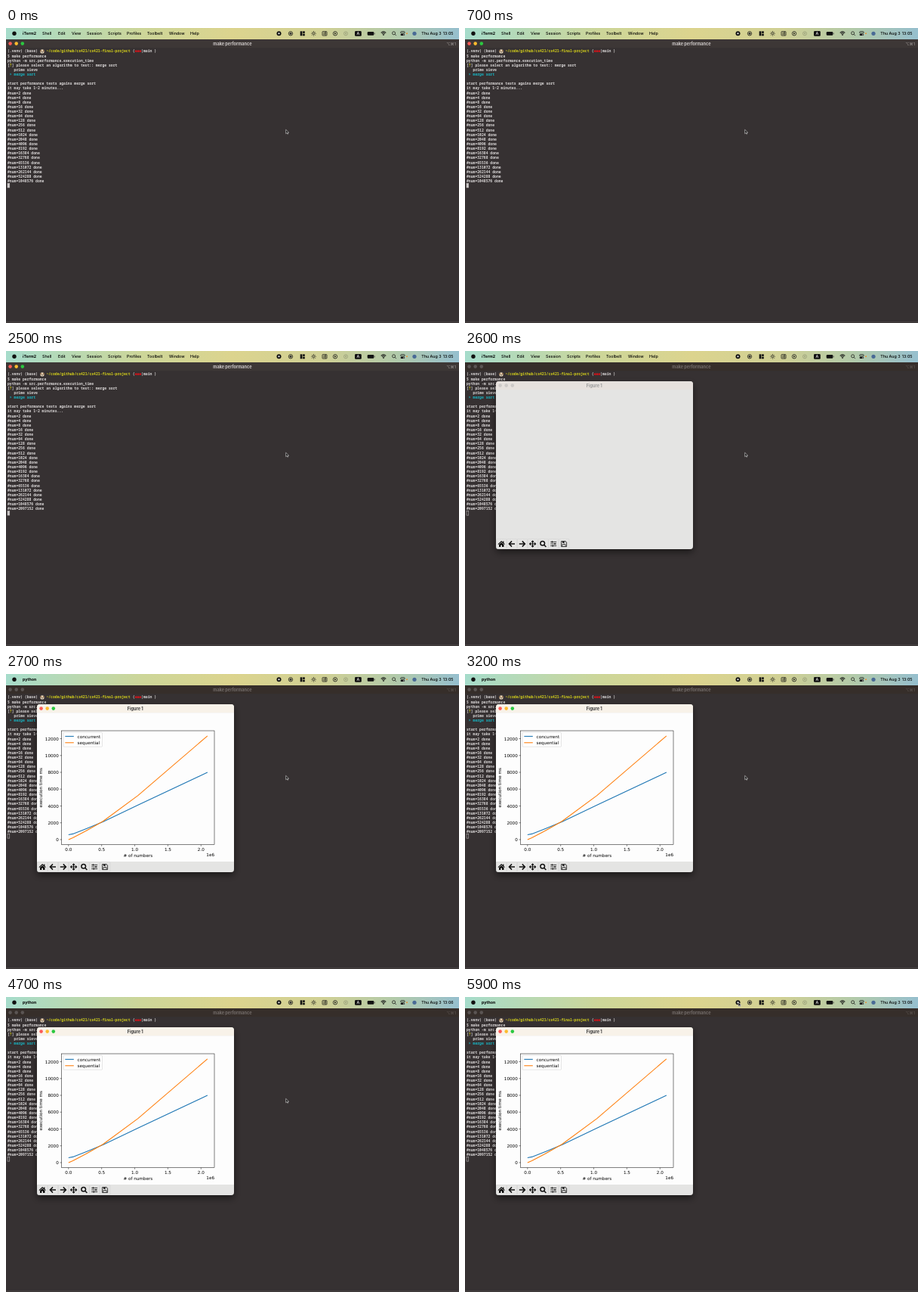
Recreate the animation shown at these times as an HTML page. Size 600x390 px, loop 6000 ms.

```html
<!DOCTYPE html>
<html lang="en">
<head>
<meta charset="utf-8">
<title>Merge sort performance</title>
<style>
  html, body { margin: 0; width: 100%; height: 100%; overflow: hidden; background: #363132; }
  svg { display: block; width: 600px; height: 390px; }
  text { white-space: pre; font: 500 5.3px Inter, sans-serif; }
  .bold { font-weight: 700; }
  .title { font-weight: 700; font-size: 5.55px; }
  .mono text { font: 600 4.76px "Noto Sans Mono", monospace; fill: #dad7d7; }
  .plot text { font: 5.66px "DejaVu Sans", sans-serif; }
  .mid { text-anchor: middle; }
  .end { text-anchor: end; }
  .line { fill: none; stroke: #111; stroke-width: .75; }
</style>
</head>
<body>
<svg id="stage" viewBox="0 0 600 390">
  <defs>
    <linearGradient id="sky">
      <stop offset="0" stop-color="#a6dccb"/>
      <stop offset=".3" stop-color="#cdd699"/>
      <stop offset=".5" stop-color="#dcd48e"/>
      <stop offset=".7" stop-color="#d0d095"/>
      <stop offset=".86" stop-color="#b2caaa"/>
      <stop offset="1" stop-color="#96bfce"/>
    </linearGradient>
    <filter id="shadow" x="-20%" y="-20%" width="140%" height="150%">
      <feDropShadow dx="0" dy="4" stdDeviation="5" flood-opacity=".5"/>
    </filter>
  </defs>
</svg>
<script>
const LOOP = 6000, STEP = 100;
const LINE_TIME = 2400, WINDOW_TIME = 2600, PLOT_TIME = 2700, CLOCK_TIME = 4000;
const MOVE_START = 5200, MOVE_END = 5800;
const COLUMN = 2.857, ROW = 6.13;

const text = (x, y, s, attrs = '') => `<text x="${x}" y="${y}" ${attrs}>${s}</text>`;
const rect = (x, y, w, h, fill, attrs = '') =>
  `<rect x="${x}" y="${y}" width="${w}" height="${h}" fill="${fill}" ${attrs}/>`;
const dot = (x, y, r, fill, attrs = '') => `<circle cx="${x}" cy="${y}" r="${r}" fill="${fill}" ${attrs}/>`;
const path = (d, attrs = 'class="line"') => `<path d="${d}" ${attrs}/>`;
const at = (x, y, s, attrs = '') => `<g transform="translate(${x} ${y})" ${attrs}>${s}</g>`;
const lights = (x, y, colors) => colors.map((c, i) => dot(x + i * 8.1, y, 2.3, c)).join('');
const LIVE = ['#fc5b57', '#fdbc2e', '#2bc840'];
const cell = (column, row, s, attrs) => text(2 + column * COLUMN, 32.4 + row * ROW, s, attrs);
const span = (color, s) => `<tspan fill="${color}">${s}</tspan>`;

function menuBar() {
  const menus = [['Shell', 48], ['Edit', 69], ['View', 87], ['Session', 107], ['Scripts', 135],
    ['Profiles', 160], ['Toolbelt', 187], ['Window', 216], ['Help', 244]];
  const rays = Array.from({length: 8}, (_, i) => `<path d="M0-2.2V-3.2" transform="rotate(${i * 45})"/>`).join('');
  return rect(0, 0, 600, 15, 'url(#sky)') + dot(11, 7.2, 2.7, '#111')
    + text(22, 9.1, 'iTerm2', 'id="appName" class="bold"')
    + `<g id="menus">${menus.map(([s, x]) => text(x, 9.1, s)).join('')}</g>`
    + at(361.5, 7.3, dot(0, 0, 3, '#111') + rect(-1, -1, 2, 2, '#eee', 'rx=".4"'))
    + at(377, 7.3, dot(0, 0, 2.7, 'none', 'class="line"') + dot(0, 0, 1.5, '#333'))
    + at(392.7, 7.3, rect(-3, -3, 2.7, 6, '#111') + rect(.4, -3, 2.7, 2.6, '#111') + rect(.4, .4, 2.7, 2.6, '#111'))
    + at(407.5, 7.3, dot(0, 0, 1.4, 'none') + `<g>${rays}</g>`, 'class="line"')
    + at(422, 7.3, rect(-3, -2.7, 6, 5.4, 'none', 'class="line" rx=".7"')
        + path('M-1.7-.7H1.5M-1.7 1H.5M1.2-2.5V2.5', 'id="trayMark" class="line"'))
    + at(436, 7.3, dot(0, 0, 2.7, 'none', 'class="line"') + path('M-.8-1.3V1.3L1.4 0Z', ''))
    + at(450, 7.3, dot(0, 0, 2.5, 'none', 'class="line"') + dot(0, 0, 1, '#333'), 'opacity=".28"')
    + rect(462, 4, 8.8, 6.8, '#111', 'rx="1.4"') + text(466.4, 9.2, 'A', 'class="mid" fill="#eee"')
    + rect(478.7, 5.1, 8.6, 4.6, '#111', 'rx="1.2"') + rect(487.8, 6.4, .8, 2, '#555')
    + at(500, 9.5, path('M-3.3-3.2Q0-6 3.3-3.2M-2-1.8Q0-3.6 2-1.8', 'class="line" style="stroke-width:1.1"') + dot(0, -.6, .9, '#111'))
    + at(513.6, 6.8, dot(0, 0, 2, 'none', 'class="line"') + path('M1.5 1.5L3.3 3.3'))
    + at(525.4, 7.3, rect(-2.8, -2.6, 5.6, 2.2, 'none', 'class="line" rx="1.1"')
        + rect(-2.8, .5, 5.6, 2.3, '#111', 'rx="1.1"') + dot(1.4, 1.6, .7, '#eee'))
    + dot(531, 7.2, .9, '#f08a24') + dot(541, 7.3, 2.6, '#496a96')
    + text(550.3, 9.1, 'Thu Aug 3') + text(578.8, 9.1, '13:05', 'id="clock"');
}

function terminal() {
  const lines = ['$ make performance', 'python -m src.performance.execution_time',
    `[${span('#d7d21a', '?')}] please select an algorithm to test:: merge sort`,
    '   prime sieve', span('#18b4c2', ' > merge sort'), '',
    'start performance tests agains merge sort', 'it may take 1~2 minutes...'];
  for (let k = 1; k <= 20; k++) lines.push(`#num=${2 ** k} done`);
  return rect(0, 14.6, 600, 375.4, '#363132') + rect(0, 14.6, 600, 11.6, '#3d3736', 'id="titleBar"')
    + path('M0 388.8H600', 'stroke="#5a5455" stroke-width=".6"')
    + `<g id="liveBar">${lights(5.6, 20.6, LIVE)}</g>`
    + `<g id="idleBar">${lights(5.6, 20.6, ['#5b5554', '#5b5554', '#5b5554'])}</g>`
    + `<g id="barText" fill="#d0cbca">${text(300, 22.5, 'make performance', 'class="mid title"')}`
    + text(596, 22.5, '⌥⌘1', 'class="end" opacity=".6"') + '</g>'
    + '<g class="mono">' + cell(0, 0, '(.venv) (base)')
    + dot(48, 30.9, 2.6, '#e6d4b8') + dot(46.2, 30.3, 1, '#8b6542') + dot(49.8, 30.3, 1, '#8b6542') + dot(48, 31.8, .7, '#333')
    + cell(18, 0, span('#d7d21a', '~/code/github/cs421/cs421-final-project'))
    + cell(58, 0, '(') + [172.2, 175, 177.8].map(x => dot(x, 30.7, 1.4, '#c9151b')).join('') + cell(62, 0, '|main )')
    + lines.map((s, i) => cell(0, i + 1, s)).join('')
    + cell(0, 29, `#num=${2 ** 21} done`, 'id="lastLine"') + '</g>'
    + rect(2, 0, 2.8, 5.6, '#cbc7c7', 'id="caret" stroke="#cbc7c7" stroke-width=".5"');
}

function plot() {
  const px = n => 82.8 + n * 87.75, py = ms => 218.95 - ms * .01112;
  // Samples at 0 and at the powers of two from 2^16 to 2^21.
  const curve = (values, color) => path('M' + values.map((v, i) =>
    `${px(i ? 2 ** (i + 15) / 1e6 : 0)} ${py(v)}`).join('L'), `fill="none" stroke="${color}" stroke-width="1.1" stroke-linejoin="round"`);
  const blue = '#1f77b4', orange = '#ff7f0e';
  let s = rect(41, 51.3, 261, 196.7, '#fdfdfd');
  for (let n = 0; n <= 2; n += .5)
    s += path(`M${px(n)} 225.7v2`, 'stroke="#000" stroke-width=".5"') + text(px(n), 234, n.toFixed(1), 'class="mid"');
  for (let ms = 0; ms <= 12000; ms += 2000)
    s += path(`M73.6 ${py(ms)}h-2`, 'stroke="#000" stroke-width=".5"') + text(69.8, py(ms) + 2.1, ms, 'class="end"');
  s += curve([580, 680, 880, 1280, 2130, 4100, 8000], blue) + curve([0, 230, 500, 1030, 2200, 5250, 12330], orange)
    + rect(73.6, 75, 202.4, 150.7, 'none', 'stroke="#000" stroke-width=".5"')
    + rect(76.2, 77.2, 51.3, 19, '#fff', 'rx=".8" stroke="#ccc" stroke-width=".5"');
  [['concurrent', blue, 82.4], ['sequential', orange, 90.8]].forEach(([name, color, y]) =>
    s += path(`M78.3 ${y}h11.5`, `stroke="${color}" stroke-width="1.1"`) + text(94.6, y + 2.1, name));
  return s + text(174.8, 242, '# of numbers', 'class="mid"') + text(276, 241.4, '1e6', 'class="end"')
    + text(0, 0, 'execution time ms', 'class="mid" transform="translate(47.6 150.3) rotate(-90)"');
}

function toolbar() {
  const thick = 'fill="none" stroke="#111" stroke-width="1.5"';
  const arrow = 'M4 0H-3.2M0-3.6L-3.6 0L0 3.6';
  const spoke = 'M0 0V-3.6M-1.5-2.4L0-4L1.5-2.4';
  const icons = [
    path('M-4.6.2L0-4L4.6.2L4 .9L0-2.6L-4 .9ZM-3.2 1L0-1.7L3.2 1V4H.9V1.6H-.9V4H-3.2ZM2-3.6H3.2V-.8L2-2Z', ''),
    path(arrow, thick),
    path(arrow, thick + ' transform="scale(-1 1)"'),
    [0, 90, 180, 270].map(a => path(spoke, `fill="none" stroke="#111" stroke-width="1.1" transform="rotate(${a})"`)).join(''),
    dot(-.7, -.7, 2.8, 'none', thick) + path('M1.5 1.5L4 4', thick),
    path('M-4-2.6H4M-4 0H4M-4 2.6H4', 'stroke="#111" stroke-width=".8"')
      + rect(-2.4, -3.6, 1.3, 2, '#111') + rect(1.2, -1, 1.3, 2, '#111') + rect(-1.6, 1.6, 1.3, 2, '#111'),
    path('M-3.5-3.5H2.3L3.6-2.2V3.6H-3.5ZM-2 3.4V.6H2V3.4', 'fill="none" stroke="#111" stroke-width=".8"')
      + rect(-2, -3.3, 3.4, 2.2, '#111') + rect(0, -2.9, .9, 1.4, '#e4e4e4')];
  return icons.map((icon, i) => rect(41.6 + i * 13.8, 248.5, 13.5, 13, 'none', 'rx="1" stroke="#d0d0d0" stroke-width=".5"')
    + at(48.2 + i * 13.8, 255, icon)).join('');
}

function figure() {
  return '<g id="figure">' + rect(41, 40, 261, 222, '#e4e4e3', 'rx="4" filter="url(#shadow)"')
    + path('M41 51.3V44Q41 40 45 40H298Q302 40 302 44V51.3Z', 'id="figureBar"')
    + `<g id="figureIdle">${lights(46.6, 45.6, ['#cdc9c7', '#cdc9c7', '#cdc9c7'])}</g>`
    + `<g id="plot"><g class="plot">${plot()}</g>${lights(46.6, 45.6, LIVE)}</g>`
    + text(171.3, 47.5, 'Figure 1', 'id="figureTitle" class="mid title"') + toolbar() + '</g>';
}

stage.innerHTML += terminal() + menuBar() + figure()
  + path('M0 0V5.4L1.3 4.2L2.2 6L3 5.6L2.2 3.9H3.9Z', 'id="pointer" fill="#111" stroke="#ddd" stroke-width=".6"');

const get = id => document.getElementById(id);
const show = (id, on) => get(id).style.display = on ? '' : 'none';
const set = (id, name, value) => get(id).setAttribute(name, value);

function render(now) {
  const t = Math.floor(now % LOOP / STEP) * STEP;
  const opened = t >= WINDOW_TIME, plotted = t >= PLOT_TIME, printed = t >= LINE_TIME;

  show('lastLine', printed);
  set('caret', 'y', printed ? 211.5 : 205.4);
  set('caret', 'fill', opened ? 'none' : '#cbc7c7');
  show('liveBar', !opened);
  show('idleBar', opened);
  set('titleBar', 'fill', opened ? '#362e2a' : '#3d3736');
  set('barText', 'opacity', opened ? .4 : 1);

  show('figure', opened);
  show('plot', plotted);
  show('figureIdle', !plotted);
  set('figureBar', 'fill', plotted ? '#f8f2e9' : '#e7e1dd');
  set('figureTitle', 'fill', plotted ? '#333' : '#999');

  show('menus', !plotted);
  get('appName').textContent = plotted ? 'python' : 'iTerm2';
  get('clock').textContent = t >= CLOCK_TIME ? '13:06' : '13:05';
  set('trayMark', 'opacity', t >= 500 && t < 700 ? .5 : 1);

  const p = Math.min(1, Math.max(0, (t - MOVE_START) / (MOVE_END - MOVE_START)));
  const ease = p * p * (3 - 2 * p);
  set('pointer', 'transform', `translate(${370.7 - 8.7 * ease} ${134.3 - 127.3 * ease})`);
}

const start = performance.now();
function tick() {
  render(performance.now() - start);
  requestAnimationFrame(tick);
}
tick();
</script>
</body>
</html>
```
